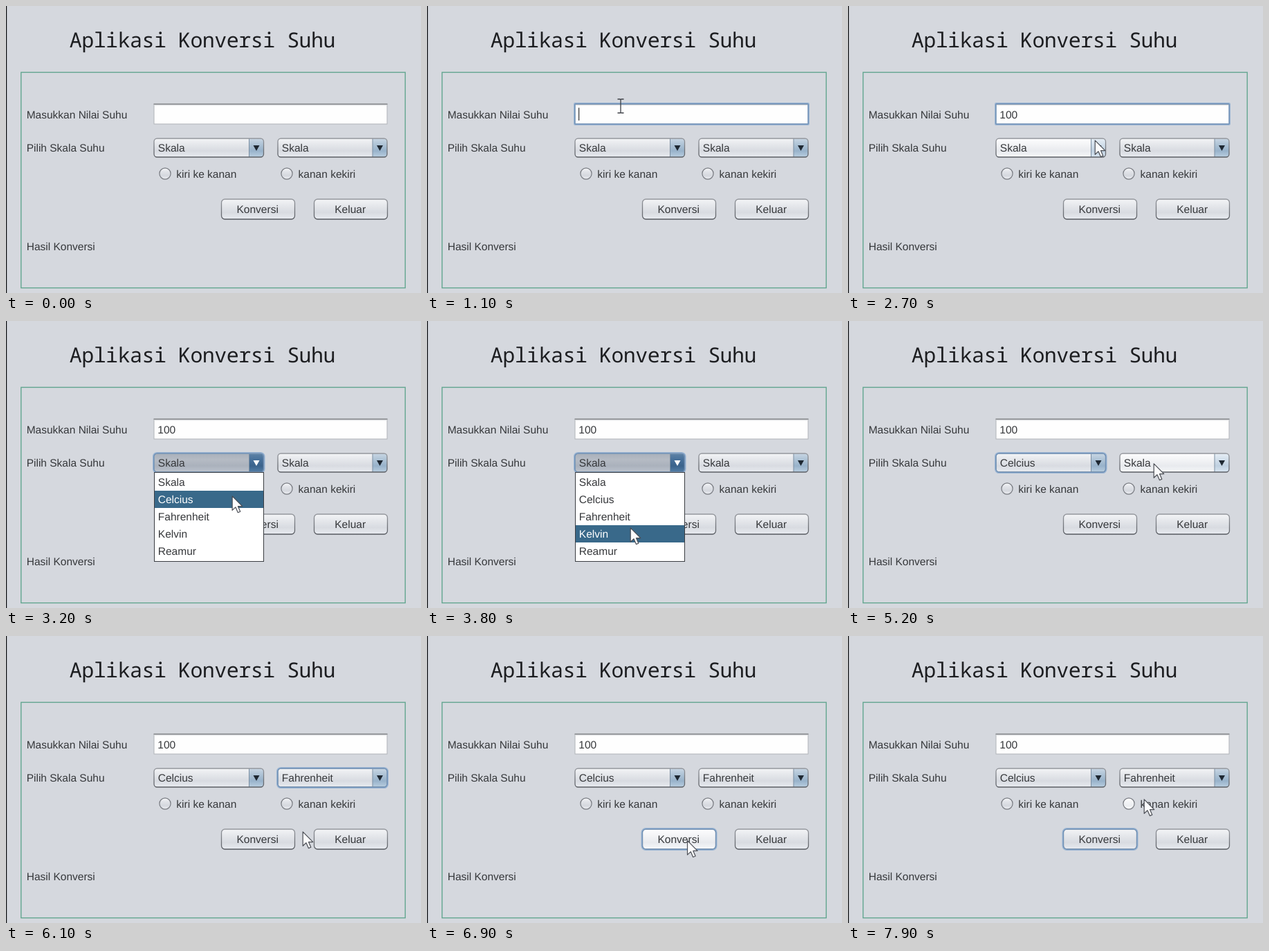
Animation of 600x416 px, one loop 8 s. Source, as an HTML page:

```html
<!DOCTYPE html>
<html lang="id">
<head>
<meta charset="utf-8">
<title>Aplikasi Konversi Suhu</title>
<style>
  html, body { margin: 0; width: 100%; height: 100%; overflow: hidden; background: #d5d8de; }
  svg { display: block; width: 600px; height: 416px; }
  text { font: 15.5px "Liberation Sans", Arial, sans-serif; fill: #36383b; white-space: pre; text-rendering: geometricPrecision; }
  .title { font: 30px "Noto Sans Mono", "DejaVu Sans Mono", monospace; letter-spacing: -.53px; fill: #1d1e21; }
</style>
</head>
<body>
<svg id="stage" viewBox="0 0 600 416"></svg>
<script>
const NS = 'http://www.w3.org/2000/svg';
const stage = document.getElementById('stage');
const LOOP = 8000, STEP = 100;
const ITEMS = ['Skala', 'Celcius', 'Fahrenheit', 'Kelvin', 'Reamur'];
const ROW_TOP = 221, ROW = 25;

function add(parent, tag, attrs = {}, text) {
  const el = document.createElementNS(NS, tag);
  for (const k in attrs) el.setAttribute(k, attrs[k]);
  if (text !== undefined) el.textContent = text;
  parent.appendChild(el);
  return el;
}
const box = (parent, x, y, width, height, rest) => add(parent, 'rect', { x, y, width, height, ...rest });
const label = (parent, x, y, text, rest) => add(parent, 'text', { x, y, ...rest }, text);
const show = (el, on) => el.setAttribute('visibility', on ? 'visible' : 'hidden');
const fill = (el, name) => el.setAttribute('fill', `url(#${name})`);

const defs = add(stage, 'defs');
function gradient(id, ...colors) {
  const g = add(defs, 'linearGradient', { id, x1: 0, y1: 0, x2: 0, y2: 1 });
  colors.forEach((c, i) => add(g, 'stop', { offset: i / (colors.length - 1), 'stop-color': c }));
}
gradient('face', '#f3f4f6', '#e5e7eb', '#d8dbe1', '#e8ebf0');
gradient('faceHover', '#fdfdfe', '#f3f4f6', '#e8eaee', '#f6f8fa');
gradient('facePress', '#a9b0ba', '#b5bbc4', '#aab1bc', '#bcc3cd');
gradient('arrowFace', '#c8d6e3', '#aec3d6', '#98b2ca', '#b9cee0');
gradient('arrowHover', '#e6eef5', '#d2dfeb', '#bfd0e0', '#dae7f2');
gradient('arrowPress', '#5f83a6', '#47709a', '#3a638c', '#527da6');
gradient('edge', '#94979d', '#5b5e64');
gradient('radio', '#f6f7f9', '#e1e3e8', '#d5d8de', '#eceef2');
gradient('radioHover', '#ffffff', '#f4f5f7', '#eceef1', '#fbfcfd');

const ring = (x, y, w, h, r) => {
  const g = add(stage, 'g', { fill: 'none' });
  box(g, x - .7, y - .7, w + 1.4, h + 1.4, { rx: r, stroke: '#9ab4d2', 'stroke-width': 2.6 });
  box(g, x - .2, y - .2, w + .4, h + .4, { rx: r, stroke: '#6d8fb5', 'stroke-width': 1.2 });
  return g;
};

function makeCombo(x, w) {
  const y = 192, h = 27, split = x + w - 21;
  const face = box(stage, x, y, w, h, { rx: 4.5 });
  const button = add(stage, 'path', { d: `M${split} ${y}H${x + w - 4}q4 0 4 4v${h - 8}q0 4-4 4H${split}z` });
  add(stage, 'path', { d: `M${split} ${y}v${h}`, stroke: '#7c8fa2' });
  box(stage, x, y, w, h, { rx: 4.5, fill: 'none', stroke: 'url(#edge)', 'stroke-width': 1.3 });
  const focus = ring(x, y, w, h, 5);
  const mark = add(stage, 'path', { d: `M${x + w - 15} 202h9l-4.5 8z` });
  const value = label(stage, x + 5.8, 211.4, '');
  return { x, y, w, h, update(text, focused, hover, open) {
    value.textContent = text;
    show(focus, focused);
    const state = open ? 'Press' : hover ? 'Hover' : '';
    fill(face, 'face' + state);
    fill(button, 'arrow' + (state || 'Face'));
    mark.setAttribute('fill', open ? '#fff' : '#1e2832');
  } };
}

function makeButton(x, text) {
  const y = 280, w = 106, h = 29;
  box(stage, x, y + 1, w, h, { rx: 5, fill: '#b9bdc5' });
  const face = box(stage, x, y, w, h, { rx: 5, stroke: 'url(#edge)', 'stroke-width': 1.3 });
  const focus = ring(x, y, w, h, 5.5);
  label(stage, x + w / 2 - .8, 300.4, text, { 'text-anchor': 'middle' });
  return { x, y, w, h, update(focused, hover, pressed) {
    show(focus, focused);
    fill(face, pressed ? 'facePress' : hover ? 'faceHover' : 'face');
  } };
}

function makeRadio(x, text, textX) {
  const dot = add(stage, 'circle', { cx: x, cy: 243, r: 8.1, stroke: '#777a80', 'stroke-width': 1.2 });
  label(stage, textX, 248.6, text);
  return { x: x - 9, y: 233, w: 110, h: 20, update: hover => fill(dot, hover ? 'radioHover' : 'radio') };
}

function makePopup(x) {
  const g = add(stage, 'g');
  box(g, x + .5, 219.5, 158, 129, { fill: '#fff', stroke: '#3a3d42' });
  const bar = box(g, x + 1, ROW_TOP, 157, ROW, { fill: '#39698a' });
  const rows = ITEMS.map((t, i) => label(g, x + 5.8, ROW_TOP + 18 + ROW * i, t));
  return (open, index) => {
    show(g, open);
    bar.setAttribute('y', ROW_TOP + ROW * index);
    rows.forEach((r, i) => { r.style.fill = i === index ? '#fff' : ''; });
  };
}

box(stage, 0, 0, 600, 416, { fill: '#d5d8de' });
box(stage, 0, 0, 1.2, 416, { fill: '#08090b' });
label(stage, 91.7, 60, 'Aplikasi Konversi Suhu', { class: 'title' });
box(stage, 21.8, 96.2, 555.4, 312.4, { fill: 'none', stroke: '#62a68f', 'stroke-width': 1.4 });
label(stage, 29.7, 162.6, 'Masukkan Nilai Suhu');
label(stage, 29.7, 211.3, 'Pilih Skala Suhu');
label(stage, 29.7, 354.2, 'Hasil Konversi');

const field = { x: 214, y: 142, w: 337, h: 29 };
box(stage, field.x, field.y, field.w, field.h, { fill: '#fefefe', stroke: '#b0b3b8' });
add(stage, 'path', { d: 'M213.5 142.3h338', stroke: '#8b8d92', 'stroke-width': 1.6 });
add(stage, 'path', { d: 'M214.5 143.7h336', stroke: '#d0d2d6' });
const fieldFocus = ring(field.x, field.y, field.w, field.h, 1);
const typed = label(stage, 219.3, 162.6, '');
const caret = box(stage, 0, 147.5, 1.2, 18.5, { fill: '#333' });

const left = makeCombo(214, 158.5), right = makeCombo(393, 158);
const radios = [makeRadio(230, 'kiri ke kanan', 246.3), makeRadio(406, 'kanan kekiri', 422.6)];
const convert = makeButton(311.5, 'Konversi'), quit = makeButton(445.5, 'Keluar');
const leftPopup = makePopup(214), rightPopup = makePopup(393);

const arrow = add(stage, 'path', {
  d: 'M-.8.8V21.3L4 16.8L7.4 24.6L10.8 23.2L7.5 15.6H13.8Z',
  fill: '#fcfcfd', stroke: '#4b4e55', 'stroke-width': 1.2, 'stroke-linejoin': 'round'
});
const beam = add(stage, 'path', {
  d: 'M-4.5-10h3.2q1.3 0 1.3 1.3q0-1.3 1.3-1.3h3.2M0-9V9M-4.5 10h3.2q1.3 0 1.3-1.3q0 1.3 1.3 1.3h3.2',
  fill: 'none', stroke: '#3c3f45', 'stroke-width': 1.3
});

// time, x, y of the pointer
const PATH = [
  [400, 318, 88], [900, 280, 145], [2000, 280, 145], [2700, 358, 194], [2900, 360, 205],
  [3300, 322, 262], [3800, 295, 299], [4000, 293, 301], [4400, 284, 261], [4600, 284, 259],
  [5200, 443, 206], [5400, 446, 207], [5700, 441, 284], [5800, 440, 285], [6100, 430, 283],
  [6600, 379, 295], [7000, 377, 296], [7600, 425, 243], [7900, 429, 236]
];
function pointerAt(t) {
  let i = PATH.findIndex(p => p[0] > t);
  if (i < 0) i = PATH.length - 1;
  if (i === 0) return { x: PATH[0][1], y: PATH[0][2] };
  const [t0, x0, y0] = PATH[i - 1], [t1, x1, y1] = PATH[i];
  const u = Math.min(1, (t - t0) / (t1 - t0)), k = u * u * (3 - 2 * u);
  return { x: x0 + (x1 - x0) * k, y: y0 + (y1 - y0) * k };
}

function render(t) {
  const p = pointerAt(t), seen = t >= 400;
  const within = (a, b) => t >= a && t < b;
  const leftOpen = within(2900, 4600), rightOpen = within(5400, 5800);
  const over = r => seen && !leftOpen && !rightOpen &&
    p.x >= r.x && p.x <= r.x + r.w && p.y >= r.y && p.y <= r.y + r.h;

  const editing = within(900, 2900);
  const digits = [1500, 1700, 1900].filter(k => t >= k).length;
  typed.textContent = '100'.slice(0, digits);
  const blinkStart = digits ? 1300 + 200 * digits : 900;
  show(fieldFocus, editing);
  show(caret, editing && (t - blinkStart) % 1000 < 500);
  caret.setAttribute('x', 219 + 8.62 * digits);

  left.update(ITEMS[t >= 4600 ? 1 : 0], within(2900, 5400), over(left), leftOpen);
  right.update(ITEMS[t >= 5800 ? 2 : 0], within(5400, 6800), over(right), rightOpen);
  convert.update(t >= 6800, over(convert), within(6800, 6900));
  quit.update(false, over(quit), false);
  radios.forEach(r => r.update(over(r)));

  const row = Math.max(0, Math.min(4, Math.floor((p.y - ROW_TOP) / ROW)));
  leftPopup(leftOpen, row);
  rightPopup(rightOpen, row);

  const text = over(field);
  show(beam, seen && text);
  show(arrow, seen && !text);
  (text ? beam : arrow).setAttribute('transform', `translate(${p.x} ${p.y})`);
}

const start = performance.now();
function tick() {
  const t = (performance.now() - start) % LOOP;
  render(Math.floor(t / STEP) * STEP);
  requestAnimationFrame(tick);
}
tick();
</script>
</body>
</html>
```
